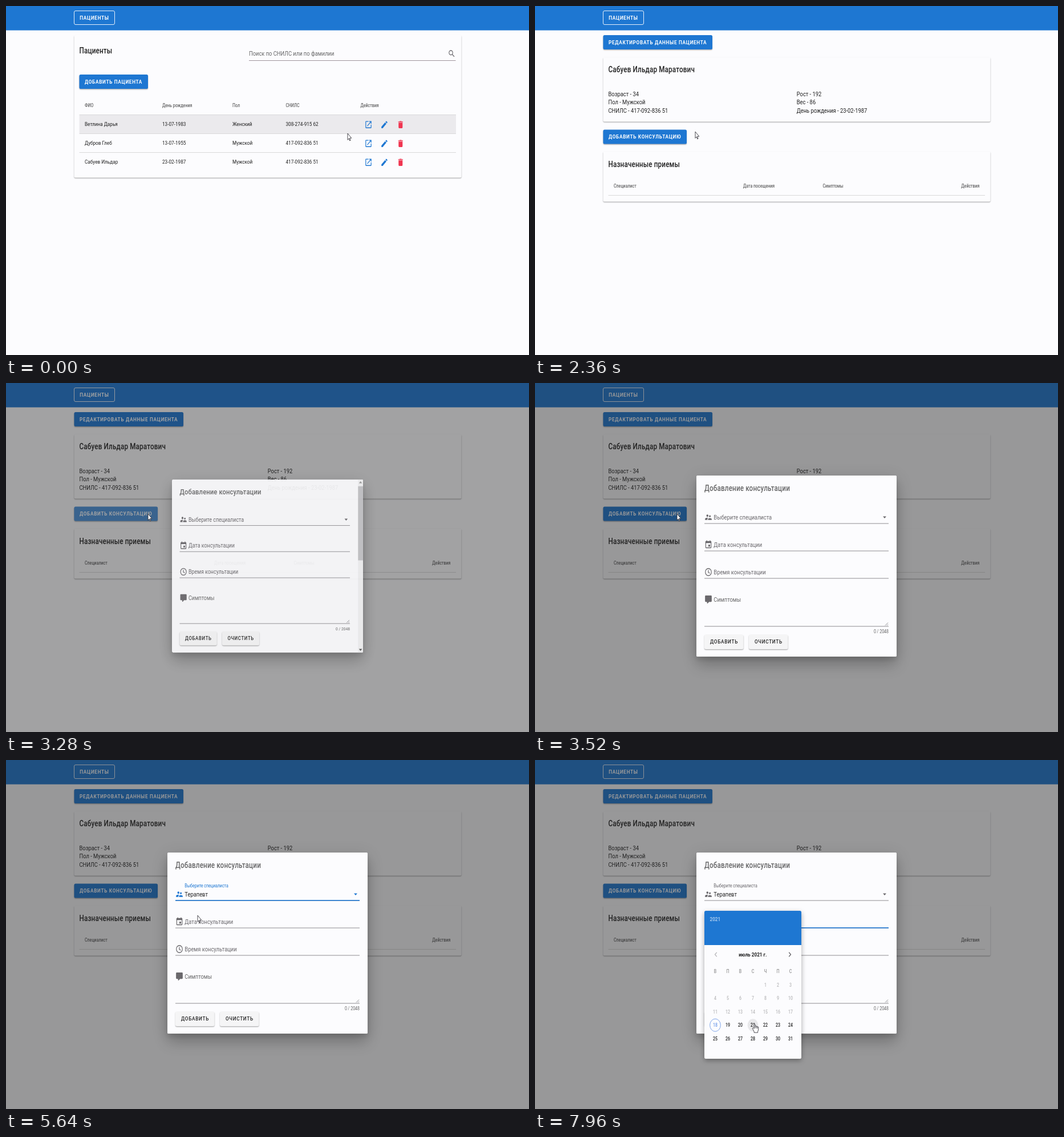
Animation, 917 px wide and 611 px high, one loop 8000 ms. Source, as an HTML page with a canvas:

```html
<!DOCTYPE html>
<html lang="ru">
<head>
<meta charset="utf-8">
<title>Пациенты</title>
<style>
html, body { margin: 0; width: 100%; height: 100%; overflow: hidden; background: #fcfcfe; }
canvas { display: block; width: 917px; height: 611px; }
</style>
</head>
<body>
<canvas id="stage" width="917" height="611"></canvas>
<script>
const W = 917, H = 611, LOOP = 8000;
// The page is squeezed a little more across than down.
const SX = 0.585, SY = 0.69;
const BLUE = [30, 119, 210], GREY = [106, 104, 108];
const PRIMARY = '#1e77d2', RED = '#f03550', PAPER = '#fcfcfe';
const INK = 'rgba(0,0,0,.87)', SOFT = 'rgba(0,0,0,.6)', RULE = 'rgba(0,0,0,.14)';

const main = document.getElementById('stage').getContext('2d');
const buffer = document.createElement('canvas');
buffer.width = W;
buffer.height = H;
const side = buffer.getContext('2d');
let ctx = main;

const icons = {
  open: 'M14,3V5H17.6L7.8,14.8L9.2,16.2L19,6.4V10H21V3M19,19H5V5H12V3H5A2,2 0 0 0 3,5V19A2,2 0 0 0 5,21H19A2,2 0 0 0 21,19V12H19Z',
  pencil: 'M20.7,7A1,1 0 0 0 20.7,5.6L18.4,3.3A1,1 0 0 0 17,3.3L15.1,5.1L18.9,8.9M3,17.2V21H6.8L17.8,9.9L14.1,6.2Z',
  trash: 'M19,4H15.5L14.5,3H9.5L8.5,4H5V6H19M6,19A2,2 0 0 0 8,21H16A2,2 0 0 0 18,19V7H6Z',
  people: 'M19,9.5A2.5,2.5 0 1 0 14,9.5A2.5,2.5 0 1 0 19,9.5M12,8A3,3 0 1 0 6,8A3,3 0 1 0 12,8M16.5,14C14.7,14 11,15 11,16.8V19H22V16.8C22,15 18.3,14 16.5,14M9,13C6.7,13 2,14.2 2,16.5V19H9V16.8C9,16 9.3,14.4 11.4,13.3Z',
  date: 'M19,19H5V8H19M16,1V3H8V1H6V3H5A2,2 0 0 0 3,5V19A2,2 0 0 0 5,21H19A2,2 0 0 0 21,19V5A2,2 0 0 0 19,3H18V1M17,12H12V17H17Z',
  note: 'M9,22A1,1 0 0 1 8,21V18H4A2,2 0 0 1 2,16V4A2,2 0 0 1 4,2H20A2,2 0 0 1 22,4V16A2,2 0 0 1 20,18H13.9L10.2,21.7Z',
  down: 'M7,10L12,15L17,10Z'
};
const outlines = {
  search: 'M15,9.5A5.5,5.5 0 1 0 4,9.5A5.5,5.5 0 1 0 15,9.5M13.7,13.7L19.7,19.7',
  clock: 'M21,12A9,9 0 1 0 3,12A9,9 0 1 0 21,12M11.8,7V12.4L16,15',
  left: 'M15,6.5L9.5,12L15,17.5',
  right: 'M9,6.5L14.5,12L9,17.5'
};
const arrowPath = new Path2D('M0,0V16.5L3.8,13L6.3,18.7L8.6,17.7L6.1,12H11.5Z');
const handPath = new Path2D('M0,0A1.7,1.7 0 0 0-1.7,1.7V12L-3.5,10.4C-5,9.2-7,10.6-6,12.2L-1.5,19.5V22H9.5V19.5C11,17 11.5,15 11.5,12V9A1.5,1.5 0 0 0 8.5,8.4V8A1.5,1.5 0 0 0 5.3,7.5V7A1.6,1.6 0 0 0 1.7,6.5V1.7A1.7,1.7 0 0 0 0,0Z');

const clamp = v => Math.max(0, Math.min(1, v));
const lerp = (a, b, p) => a + (b - a) * p;
const mix = (a, b, p) => `rgb(${a.map((v, i) => Math.round(lerp(v, b[i], p)))})`;

// cubic-bezier(.25, .8, .5, 1)
function ease(x) {
  if (x <= 0) return 0;
  if (x >= 1) return 1;
  let lo = 0, hi = 1, u = 0.5;
  for (let i = 0; i < 20; i++) {
    u = (lo + hi) / 2;
    const at = 0.75 * u * (1 - u) ** 2 + 1.5 * (1 - u) * u * u + u ** 3;
    if (at < x) lo = u; else hi = u;
  }
  return 2.4 * u * (1 - u) ** 2 + 3 * (1 - u) * u * u + u ** 3;
}
const since = (t, start, span = 300) => ease((t - start) / span);

// y is the middle of the capital letters
function text(str, x, y, size, color = INK, o = {}) {
  ctx.save();
  ctx.translate(x, y + 0.355 * size * SY);
  ctx.scale(SX, SY);
  ctx.font = `${o.weight || 400} ${size}px Roboto, sans-serif`;
  ctx.letterSpacing = (o.gap || 0) + 'px';
  ctx.textAlign = o.align || 'left';
  ctx.fillStyle = color;
  ctx.fillText(str, 0, 0);
  ctx.restore();
}
const title = (str, x, y, color) => text(str, x, y, 20, color, { weight: 500, gap: 0.25 });
const caps = (str, x, y, color, weight = 600) => text(str, x, y, 14, color, { weight, gap: 1.2 });
const head = (str, x, y, align) => text(str, x, y, 12, SOFT, { weight: 500, align });

function icon(name, x, y, color) {
  ctx.save();
  ctx.translate(x, y);
  ctx.scale(SX, SY);
  ctx.translate(-12, -12);
  if (icons[name]) {
    ctx.fillStyle = color;
    ctx.fill(new Path2D(icons[name]), 'evenodd');
  } else {
    ctx.strokeStyle = color;
    ctx.lineWidth = 2;
    ctx.stroke(new Path2D(outlines[name]));
  }
  ctx.restore();
}

function round(x, y, w, h, r = 2.5) {
  ctx.beginPath();
  ctx.roundRect(x, y, w, h, r);
}

function box(x, y, w, h, fill, drop = 1.2, blur = 1.8, shade = 0.32) {
  ctx.save();
  ctx.shadowColor = `rgba(0,0,0,${shade})`;
  ctx.shadowOffsetY = drop;
  ctx.shadowBlur = blur;
  ctx.fillStyle = fill;
  round(x, y, w, h);
  ctx.fill();
  ctx.restore();
}

function rect(x, y, w, h, fill) {
  ctx.fillStyle = fill;
  ctx.fillRect(x, y, w, h);
}

function oval(x, y, fill, stroke) {
  ctx.beginPath();
  ctx.ellipse(x, y, 16 * SX, 16 * SY, 0, 0, 7);
  if (fill) { ctx.fillStyle = fill; ctx.fill(); }
  if (stroke) { ctx.strokeStyle = stroke; ctx.lineWidth = 1; ctx.stroke(); }
}

// Draws a group with one shared opacity.
function layer(alpha, draw) {
  if (alpha <= 0) return;
  ctx = side;
  ctx.clearRect(0, 0, W, H);
  draw();
  ctx = main;
  ctx.globalAlpha = alpha;
  ctx.drawImage(buffer, 0, 0);
  ctx.globalAlpha = 1;
}

function button(label, x, y, w) {
  box(x, y, w, 25, PRIMARY);
  caps(label, x + 9.5, y + 12.5, '#fff');
}

const stops = [
  [40, 599, 223], [640, 636, 272], [2000, 636, 272], [2360, 281, 220],
  [2680, 249, 229], [3840, 249, 229], [4600, 345, 237], [5360, 345, 237],
  [5640, 336, 272], [6040, 346, 306], [6440, 333, 288], [7420, 333, 288], [7880, 385, 462]
];

function pointer(t) {
  const i = stops.findIndex(s => s[0] > t);
  if (i === 0) return stops[0].slice(1);
  if (i < 0) return stops[stops.length - 1].slice(1);
  const a = stops[i - 1], b = stops[i];
  const p = (t - a[0]) / (b[0] - a[0]);
  const q = p * p * (3 - 2 * p);
  return [lerp(a[1], b[1], q), lerp(a[2], b[2], q)];
}

const handTimes = [[500, 1080], [2560, 3110], [4400, 5460], [7820, LOOP]];

function drawPointer(t, x, y) {
  const hand = handTimes.some(([a, b]) => t >= a && t < b);
  const shape = hand ? handPath : arrowPath;
  ctx.save();
  ctx.translate(x, y);
  ctx.scale(SX, SY);
  ctx.fillStyle = '#fff';
  ctx.strokeStyle = '#2a2930';
  ctx.lineWidth = 1.3;
  ctx.fill(shape);
  ctx.stroke(shape);
  if (hand) ctx.stroke(new Path2D('M1.7,7V11M5.3,8V11M8.5,9V12'));
  ctx.restore();
}

function topBar() {
  rect(0, 0, W, 42.6, PRIMARY);
  ctx.strokeStyle = '#e6effa';
  ctx.lineWidth = 1;
  round(119.5, 8.5, 71, 24);
  ctx.stroke();
  caps('ПАЦИЕНТЫ', 129.3, 21, '#fff');
}

const patients = [
  ['Ветлина Дарья', '13-07-1983', 'Женский', '308-274-915 62'],
  ['Дубров Глеб', '13-07-1955', 'Мужской', '417-092-836 51'],
  ['Сабуев Ильдар', '23-02-1987', 'Мужской', '417-092-836 51']
];
const columns = [138, 274, 397, 490.5, 621.5];

function listPage(py) {
  box(119.5, 51, 679, 249.5, PAPER);
  title('Пациенты', 128.5, 78.5);
  text('Поиск по СНИЛС или по фамилии', 426, 83.5, 16, SOFT);
  rect(426, 95, 362.5, 1, '#a0949c');
  icon('search', 781.5, 83.5, '#6d6b70');
  button('ДОБАВИТЬ ПАЦИЕНТА', 128.5, 120, 120.5);
  ['ФИО', 'День рождения', 'Пол', 'СНИЛС', 'Действия'].forEach((s, i) => head(s, columns[i], 174.5));
  const over = Math.floor((py - 190.5) / 33);
  patients.forEach((row, i) => {
    const y = 207 + 33 * i;
    if (i === over) rect(128.5, y - 16, 660.5, 32, '#ebeaed');
    rect(128.5, y - 17, 660.5, 1, RULE);
    row.forEach((s, k) => text(s, columns[k], y, 14));
    icon('open', 635.5, y + 0.7, PRIMARY);
    icon('pencil', 663.5, y + 0.7, PRIMARY);
    icon('trash', 691.8, y + 0.7, RED);
  });
}

function ripple(t) {
  const fade = 1 - clamp((t - 3200) / 300);
  ctx.save();
  round(119.5, 216.5, 146.5, 25);
  ctx.clip();
  if (t > 2560 && t < 3110) rect(119, 216, 148, 26, 'rgba(255,255,255,.08)');
  if (t >= 3000 && fade > 0) {
    ctx.fillStyle = `rgba(255,255,255,${0.27 * fade})`;
    ctx.beginPath();
    ctx.arc(249, 229, 140 * since(t, 2990, 220), 0, 7);
    ctx.fill();
  }
  ctx.restore();
}

function patientPage(t) {
  button('РЕДАКТИРОВАТЬ ДАННЫЕ ПАЦИЕНТА', 119.5, 51, 191.5);
  box(119.5, 89.5, 679, 113, PAPER);
  title('Сабуев Ильдар Маратович', 128.5, 111.5);
  const left = ['Возраст - 34', 'Пол - Мужской', 'СНИЛС - 417-092-836 51'];
  const right = ['Рост - 192', 'Вес - 86', 'День рождения - 23-02-1987'];
  left.forEach((s, i) => text(s, 128.5, 153.7 + 14.5 * i, 16));
  right.forEach((s, i) => text(s, 458.7, 153.7 + 14.5 * i, 16));
  button('ДОБАВИТЬ КОНСУЛЬТАЦИЮ', 119.5, 216.5, 146.5);
  ripple(t);
  box(119.5, 254.5, 679, 88, PAPER);
  title('Назначенные приемы', 128.5, 277);
  head('Специалист', 138, 315);
  head('Дата посещения', 365, 315);
  head('Симптомы', 504.5, 315);
  head('Действия', 779.5, 315, 'right');
  rect(128.5, 331, 660.5, 1, RULE);
}

function field(y, name, label, right, focus = 0, lift = 0, value = '') {
  const tone = mix(GREY, BLUE, focus);
  icon(name, 304, y, tone);
  text(label, 313.3, y - 14.7 * lift, lerp(16, 12, lift), tone);
  text(value, 313.3, y, 16);
  rect(297, y + 10.5, right - 297, 1, '#8f8d92');
  const w = (right - 297) * focus;
  if (w) rect((297 + right - w) / 2, y + 10, w, 1.6, PRIMARY);
}

function smallButton(label, x) {
  box(x, 440.5, 68.5, 25.5, '#f5f5f6');
  caps(label, x + 10, 453, INK, 500);
}

function scrollBar() {
  rect(625, 162, 9, 317, '#f1f1f2');
  rect(625, 174, 9, 136, '#c3c2c6');
  icon('down', 629.5, 474, '#555');
  ctx.save();
  ctx.translate(629.5, 167);
  ctx.scale(1, -1);
  icon('down', 0, 0, '#999');
  ctx.restore();
}

function dialog(t, grow) {
  const scale = lerp(0.5, 1, grow), moving = grow < 1;
  const right = moving ? 610 : 620;
  const selFocus = since(t, 4800) - since(t, 6480);
  const dateFocus = since(t, 6480);
  ctx.save();
  ctx.translate(458.5, 320.5);
  ctx.scale(scale, scale);
  ctx.translate(-458.5, -320.5);
  box(283, 162, 351, 317, PAPER, 16, 26, 0.16);
  box(283, 162, 351, 317, PAPER, 6, 30, 0.14);
  box(283, 162, 351, 317, PAPER, 5, 9, 0.12);
  title('Добавление консультации', 297, 184.5, SOFT);
  field(235, 'people', 'Выберите специалиста', right, selFocus, since(t, 4800), t >= 5320 ? 'Терапевт' : '');
  icon('down', right - 7, 235, mix(GREY, BLUE, selFocus));
  field(283, 'date', 'Дата консультации', right, dateFocus, dateFocus);
  field(331, 'clock', 'Время консультации', right);
  icon('note', 304, 379, mix(GREY, BLUE, 0));
  text('Симптомы', 313.3, 379, 16, SOFT);
  rect(297, 425.5, right - 297, 1, '#8f8d92');
  ctx.strokeStyle = '#77757a';
  ctx.lineWidth = 0.8;
  ctx.stroke(new Path2D(`M${right - 6},424.5l5,-5M${right - 3},424.5l2,-2`));
  text('0 / 2048', right, 435.5, 12, SOFT, { align: 'right' });
  smallButton('ДОБАВИТЬ', 297);
  smallButton('ОЧИСТИТЬ', 375);
  if (moving) scrollBar();
  ctx.restore();
}

function menu() {
  box(297, 216, 323, 38, '#fff', 3, 8, 0.35);
  rect(297, 221, 323, 28, '#f3f3f4');
  text('Терапевт', 306.5, 235, 16);
}

function picker(t) {
  const mid = { align: 'center', weight: 500 };
  box(297, 264, 170, 259, PAPER, 3, 8, 0.35);
  ctx.fillStyle = PRIMARY;
  round(297, 264, 170, 60, [2.5, 2.5, 0, 0]);
  ctx.fill();
  text('2021', 306.5, 279, 14, 'rgba(255,255,255,.7)', { weight: 500 });
  icon('left', 317, 340.5, '#b5b4b8');
  icon('right', 447, 340.5, '#5c5b60');
  text('июль 2021 г.', 381.8, 340.5, 14, INK, { align: 'center', weight: 700 });
  [...'ВПВСЧПС'].forEach((s, i) => text(s, 316 + 22 * i, 370, 12, 'rgba(0,0,0,.42)', mid));
  const glow = clamp((t - 7840) / 100);
  for (let day = 1; day <= 31; day++) {
    const cell = day + 3;
    const x = 316 + 22 * (cell % 7), y = 394 + 23.4 * Math.floor(cell / 7);
    if (day === 18) oval(x, y, null, '#7fa5ea');
    if (day === 21 && glow) oval(x, y, `rgba(0,0,0,${0.08 * glow})`);
    const color = day < 18 ? 'rgba(0,0,0,.27)' : day === 18 ? '#6f9bea' : INK;
    text(String(day), x, y, 12, color, mid);
  }
}

function draw(t) {
  const [px, py] = pointer(t);
  rect(0, 0, W, H, PAPER);
  topBar();
  if (t < 1080) listPage(py);
  else patientPage(t);
  const grow = since(t, 3115);
  if (grow > 0) {
    rect(0, 0, W, H, `rgba(33,33,33,${0.46 * since(t, 3122)})`);
    layer(grow, () => dialog(t, grow));
    layer(since(t, 4840) - since(t, 5320, 280), menu);
    layer(since(t, 7080), () => picker(t));
  }
  drawPointer(t, px, py);
}

function tick(now) {
  draw(now % LOOP);
  requestAnimationFrame(tick);
}
draw(0);
requestAnimationFrame(tick);
</script>
</body>
</html>
```
